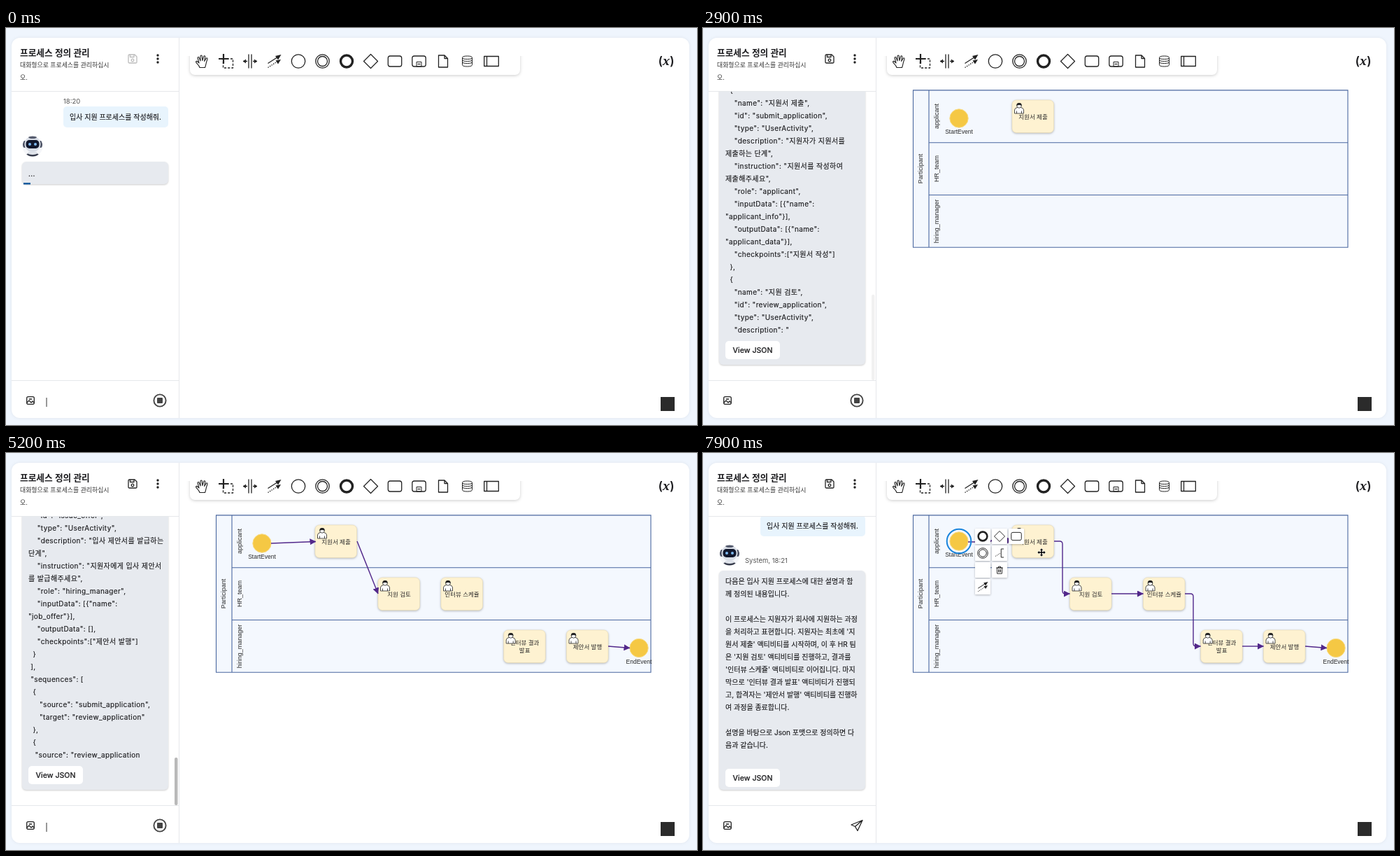
Write an HTML page that moves like this. It is 988x567 px and loops after 8 s.

```html
<!DOCTYPE html>
<html lang="ko">
<head>
<meta charset="utf-8">
<title>프로세스 정의 관리</title>
<style>
  html, body { margin: 0; width: 100%; height: 100%; overflow: hidden; background: #eff5fd; }
  svg { display: block; }
  text { white-space: pre; fill: #1c1c1f; font: 10px Inter, "Noto Sans CJK KR", "Noto Sans CJK", sans-serif; }
  .chat text { stroke: #1c1c1f; stroke-width: .15px; }
  .chat .muted { font-size: 9.5px; fill: #555; stroke: none; }
  .chat .json { letter-spacing: .38px; }
  .diagram text { font: 8.5px "Liberation Sans", "Noto Sans CJK KR", "Noto Sans CJK", sans-serif; fill: #2a2a2a; text-anchor: middle; }
  .diagram .lane { font-size: 9px; }
  .icon { fill: none; stroke: #222; stroke-width: 1.3; stroke-linejoin: round; }
  .solid { fill: #222; stroke: none; }
  .flow { fill: none; stroke: #52288a; stroke-width: 1.4; marker-end: url(#arrow); }
  .select { fill: none; stroke: #1a85dd; stroke-width: 2; }
  .shadow { filter: drop-shadow(0 1px 1.5px #0004); }
</style>
</head>
<body>
<svg id="stage" width="988" height="567" viewBox="0 0 988 567"></svg>
<script>
const LOOP = 8000, STEP = 100, DONE = 5800;

const activity = (name, id, desc, instruction, role, input, output, check, end = '},') => `  {
    "name": "${name}",
    "id": "${id}",
    "type": "UserActivity",
    "description": "${desc}",
    "instruction": "${instruction}",
    "role": "${role}",
    "inputData": [{"name":
"${input}"}],
    "outputData": [${output ? `{"name":\n"${output}"}` : ''}],
    "checkpoints":["${check}"]
  ${end}`;

const sequence = (source, target, indent, end = '},') => `  {
${indent}"source": "${source}",
${indent}"target": "${target}"
  ${end}`;

const lines = [
`다음은 입사 지원 프로세스에 대한 설명과 함
께 정의된 내용입니다.

이 프로세스는 지원자가 회사에 지원하는 과정
을 처리하고 표현합니다. 지원자는 최초에 '지
원서 제출' 액티비티를 시작하며, 이 후 HR 팀
은 '지원 검토' 액티비티를 진행하고, 결과를
'인터뷰 스케쥴' 액티비티로 이어집니다. 마지
막으로 '인터뷰 결과 발표' 액티비티가 진행되
고, 합격자는 '제안서 발행' 액티비티를 진행하
여 과정을 종료합니다.

설명을 바탕으로 Json 포맷으로 정의하면 다
음과 같습니다.

{
 "processDefinitionName": "입사 지원
프로세스",
 "processDefinitionId":
"job_application_process",
 "description": "지원자의 입사 지원을
처리하는 과정",
 "data": [{
    "name": "applicant_data",
    "description": "지원자 정보",
    "type": "Text"
  }, {
    "name": "review_result",
    "type": "Text"
  }, {
    "name": "job_offer"
 }],
 "roles": [{
   "name": "applicant",
   "resolutionRule": "지원서를 제출하는
사람"
 }, {
   "name": "HR_team",
   "resolutionRule": "지원서를 검토하고
인터뷰 일정을 조정하는 담당 팀"
 },
  {
   "name": "hiring_manager",
   "resolutionRule": "인터뷰를 진행하고
입사 제안을 결정하는 관리자"
  }
 ],
 "activities": [`,
activity('지원서 제출', 'submit_application', '지원자가 지원서를\n제출하는 단계', '지원서를 작성하여\n제출해주세요',
  'applicant', 'applicant_info', 'applicant_data', '지원서 작성'),
activity('지원 검토', 'review_application', 'HR 팀이 지원서를 검토\n하는 단계', '제출된 지원서를 검토 후\n결과를 알려주세요',
  'HR_team', 'applicant_data', 'review_result', '지원서 검토'),
activity('인터뷰 스케쥴', 'schedule_interview', '인터뷰 일정을 조정하는\n단계', '인터뷰 일정을 지원자와\n조율해주세요',
  'HR_team', 'review_result', 'interview_date', '일정 조정'),
activity('인터뷰 결과 발표', 'announce_result', '인터뷰 결과를 발표하는\n단계', '인터뷰 결과를 지원자에\n게 알려주세요',
  'hiring_manager', 'interview_date', 'job_offer', '결과 발표'),
activity('제안서 발행', 'issue_offer', '입사 제안서를 발급하는\n단계', '지원자에게 입사 제안서\n를 발급해주세요',
  'hiring_manager', 'job_offer', '', '제안서 발행', '}'),
` ],
 "sequences": [`,
sequence('submit_application', 'review_application', '     '),
sequence('review_application', 'schedule_interview', '   '),
sequence('schedule_interview', 'announce_result', '   '),
sequence('announce_result', 'issue_offer', '   ', '}'),
'  ]\n}'
].join('\n').split('\n');

// [time, number of lines typed]
const typing = [[200, 0], [1300, 9.97], [1500, 9.97], [2200, 50.33], [3600, 84.92], [5200, 129.95], [5700, lines.length]];

// Piecewise linear value of [time, value] keys.
function track(keys, t) {
  const i = keys.findIndex(k => k[0] > t);
  if (i < 0) return keys[keys.length - 1][1];
  if (i === 0) return keys[0][1];
  const [t0, a] = keys[i - 1], [t1, b] = keys[i];
  return a + (b - a) * (t - t0) / (t1 - t0);
}

const at = (x, y, body, cls = 'icon') => `<g class="${cls}" transform="translate(${x} ${y})">${body}</g>`;
const label = (x, y, s, attrs = '') => `<text x="${x}" y="${y + 3.6}" ${attrs}>${s}</text>`;
const rect = (x, y, w, h, r, attrs = '') => `<rect x="${x}" y="${y}" width="${w}" height="${h}" rx="${r}" ${attrs}/>`;
const circle = (r, attrs = '') => `<circle r="${r}" ${attrs}/>`;
const path = (d, attrs = '') => `<path d="${d}" ${attrs}/>`;

const icons = {
  hand: path('M-3 9C-4 5-7 4-8.5 1Q-8-1-6 .5L-4 2.5L-6-5Q-5-7.5-3.8-5L-2-.5L-2-7.5Q-.8-9.5.3-7.5L.8-1L3-7.5Q4.8-8.5 4.8-6L3.6 0L6.5-4.5Q8.5-5 7.8-2.5C6 2 6 5 4.5 9Z', 'stroke-width="1.1"'),
  lasso: path('M-4-3.5H10V9.5H-4Z', 'stroke-dasharray="3.2 2"') + path('M-3.5-10.5V3.5M-10.5-3.5H3.5', 'stroke-width="2.2"'),
  space: path('M-2-10V10M2-10V10M-10 0H-4M4 0H10') + path('M-10 0l4-3v6zM10 0l-4-3v6z', 'class="solid"'),
  connect: path('M-9 3L5-6') + path('M-9 9L5 0', 'stroke-dasharray="1.5 1.5"') +
    path('M10-9.5L1.5-7.5L5.5-2ZM9.5-2.5L2-1L5.5 4Z', 'class="solid"'),
  start: circle(9.7),
  between: circle(9.7) + circle(7),
  end: circle(8.5, 'stroke-width="3.4"'),
  gateway: path('M0-10L10 0L0 10L-10 0Z'),
  task: rect(-9.7, -7.5, 19.4, 15, 3),
  subprocess: rect(-9.7, -7.5, 19.4, 15, 3) + rect(-3.5, 1, 7, 6.5, 0, 'stroke-width="1"') + path('M-2 4H2'),
  document: path('M-6.5-8.5H2L6.5-4V8.5H-6.5ZM2-8.5V-4H6.5'),
  store: path('M-7-5V5Q-7 7.5 0 7.5T7 5V-5Q7-7.5 0-7.5T-7-5Q-7-3 0-3T7-5M-7-2Q-7 0 0 0T7-2M-7 1Q-7 3 0 3T7 1', 'stroke-width="1"'),
  pool: path('M-10.3-7H10.3V7H-10.3ZM-6.5-7V7'),
  note: path('M8-8H3V8H8') + path('M-8 6L2 0', 'stroke-dasharray="1.5 1.5"'),
  trash: path('M-5-4H5L4.5 7H-4.5ZM-6.5-4H6.5M-2-4V-6.5H2V-4M-2-1V4.5M0-1V4.5M2-1V4.5', 'stroke-width="1.2"')
};

const tools = ['hand', 'lasso', 'space', 'connect', 'start', 'between', 'end', 'gateway', 'task', 'subprocess', 'document', 'store', 'pool'];

const scenery = `
<defs>
  <clipPath id="chatArea"><rect x="8" y="91" width="239" height="412"/></clipPath>
  <clipPath id="barArea"><rect x="25" width="206" height="567"/></clipPath>
  <clipPath id="toolArea"><rect x="250" y="40" width="500" height="40"/></clipPath>
  <clipPath id="avatar"><circle r="14.5"/></clipPath>
  <linearGradient id="bar" gradientUnits="userSpaceOnUse" x1="23" x2="232"><stop stop-color="#145a9c"/><stop offset="1" stop-color="#7fd0f5"/></linearGradient>
  <marker id="arrow" viewBox="0 0 10 10" refX="9.5" refY="5" markerWidth="9" markerHeight="9" markerUnits="userSpaceOnUse" orient="auto"><path d="M0 0L10 5L0 10Z" fill="#52288a"/></marker>
</defs>
${rect(8, 14, 969, 543, 12, 'fill="#fff" style="filter:drop-shadow(0 0 2px #0001)"')}
${path('M247.5 14V557M8 90.5H247M8 503.5H247', 'stroke="#e6e8eb"')}
${label(20, 36, '프로세스 정의 관리', 'style="font-size:12.7px;font-weight:600"')}
${label(20, 52, '대화형으로 프로세스를 관리하십시', 'style="font-size:8.9px;fill:#333"')}
${label(20, 70, '오.', 'style="font-size:8.9px;fill:#333"')}
${at(217, 44, [-5, 0, 5].map(y => circle(1.7, `cy="${y}"`)).join(''), 'solid')}
${at(35, 532, rect(-5.3, -5.3, 10.6, 10.6, 2) + path('M-5 3L-2 0L1 3L3 1L5 3M-2-2H2'))}
<g clip-path="url(#toolArea)">${rect(263, 20, 472, 47, 7, 'fill="#fff" style="filter:drop-shadow(0 1px 2px #0003)"')}</g>
${tools.map((name, i) => at(280 + i * 34.5, 47.5, icons[name])).join('')}
<text x="944" y="52.5" text-anchor="middle" style="font-size:17px;font-weight:600">(<tspan style="font-family:'Noto Serif',serif;font-style:italic">x</tspan>)</text>
${rect(936, 527, 20, 20, 0, 'fill="#2b2b2b"')}
<g id="live"></g>`;

const robot = `<g clip-path="url(#avatar)">
  <rect x="-15" y="-15" width="30" height="30" fill="#f5f6f9"/>
  <ellipse cy="14" rx="10" ry="5" fill="#353a4a"/><ellipse cy="9.5" rx="7" ry="2.5" fill="#dfe3ea"/>
  <ellipse cx="-11.5" cy="-3" rx="2.5" ry="5" fill="#4a5063"/><ellipse cx="11.5" cy="-3" rx="2.5" ry="5" fill="#4a5063"/>
  <ellipse cy="-3" rx="11.5" ry="11" fill="#d9dee7"/><ellipse cy="-13" rx="6" ry="2" fill="#565c6e"/>
  <rect x="-9.5" y="-9" width="19" height="12" rx="5" fill="#11172c"/>
  <circle cx="-4" cy="-3" r="2" fill="#7db9f2"/><circle cx="4" cy="-3" r="2" fill="#7db9f2"/></g>`;

function chat(t, typed) {
  const done = t >= DONE, hasJson = typed >= 15;
  const count = done ? 15 : Math.max(1, Math.ceil(typed));
  const last = 206 + 18 * (count - 1);
  const bottom = last + (done ? 46 : hasJson ? 50 : 17);
  const scroll = Math.max(0, bottom - 481);
  const blinkOn = t % 1000 < 550;

  let out = label(82, 104, '18:20', 'class="muted"') +
    rect(82, 112, 150, 30, 5, 'fill="#e8f4fd"') + label(91, 127, '입사 지원 프로세스를 작성해줘.') +
    at(38, 169, robot, '') + (done ? label(60, 176, 'System, 18:21', 'class="muted"') : '') +
    rect(23, 191, 209, bottom - 191, 6, 'fill="#e7eaef" style="filter:drop-shadow(0 1px 1px #0003)"');

  if (typed <= 0) out += label(32, 208, '...', 'class="json"');
  for (let i = 0; i < count; i++) {
    const y = 206 + 18 * i;
    if (y - scroll < 75) continue;
    const shown = done ? lines[i] : lines[i].slice(0, Math.floor(lines[i].length * Math.min(1, Math.max(0, typed - i))));
    out += label(32, y, shown, i < 15 ? '' : 'class="json"');
  }
  if (hasJson) out += rect(32, last + 16, 78, 26, 5, 'fill="#fff"') +
    label(71, last + 29, 'View JSON', 'text-anchor="middle" style="font-size:10.6px;font-weight:500"');
  if (!done && (t < 1400 || t > 2000)) {
    const x = 23 - 34 + 390 * (t / 611.8 % 1);
    out += `<g clip-path="url(#barArea)">${rect(x, bottom - 2, 46, 2.5, 0, 'fill="url(#bar)"')}</g>`;
  }
  out = `<g class="chat" clip-path="url(#chatArea)"><g transform="translate(0 ${-scroll})">${out}</g></g>`;

  if (scroll && !done) {
    const thumb = 413 * 413 / (413 + scroll);
    out += rect(241, 503 - thumb, 4.5, thumb, 2, `fill="#b9b9b9" opacity="${blinkOn ? 1 : .2}"`);
  }
  out += at(181, 44, path('M-6-4.5Q-6-6-4.5-6H3L6-3V4.5Q6 6 4.5 6H-4.5Q-6 6-6 4.5ZM-3.5-6V-2.5H2V-6') + circle(1.8, 'cy="2"'), `icon" opacity="${hasJson ? 1 : .3}`);
  if (done) return out + at(220, 532, path('M8-7.5L-8-1L-2.5 1.5L1 7.5ZM8-7.5L-2.5 1.5'));
  if (blinkOn) out += path('M58 528V541', 'stroke="#333"');
  return out + at(220, 532, circle(8.6, 'stroke="#444" stroke-width="1.9"') + rect(-4, -4, 8, 8, 1, 'fill="#444" stroke="none"'));
}

const person = path('M-6.5 7V2Q-6-1-2.5-1.5L2.5-1.5Q6-1 6.5 2V7ZM-3.5 7V3.5M3.5 7V3.5', 'fill="#fff" stroke="#222" stroke-width=".8"') +
  circle(3.4, 'cy="-4.2" fill="#fff" stroke="#222" stroke-width=".8"') + path('M-3.5-4Q-4-8 0-8T3.5-4Q0-6-3.5-4Z', 'fill="#222"');

const task = (x, y, ...names) => at(x, y,
  rect(0, 0, 59.5, 46.5, 6, 'class="shadow" fill="#fef2d1" stroke="#eadcb4" stroke-width=".6"') +
  names.map((s, i) => label(30, 23 + (i - (names.length - 1) / 2) * 10.5, s)).join('') + at(10, 12, person, ''), '');

const event = (x, y, name) => at(x, y, circle(13.2, 'fill="#f5c844" stroke="#f9dc86"') + label(0, 18.5, name), '');
const flow = d => path(d, 'class="flow"');

function contextPad(x, y) {
  const rows = [['end', 'gateway', 'task'], ['between', 'note'], ['', 'trash'], ['connect']];
  return rows.map((row, r) => row.map((name, c) => at(x + 24 * c, y + 24 * r,
    rect(-11, -11, 22, 22, 1, 'class="shadow" fill="#fff" stroke="none"') + `<g transform="scale(.75)">${icons[name] || ''}</g>`)).join('')).join('');
}

function diagram(t, typed) {
  if (typed < 44) return '';
  const reviewX = track([[5900, 532], [6100, 524.5]], t);
  const scheduleX = track([[6100, 622], [6300, 629.5]], t);
  const startY = track([[6300, 129], [6400, 126]], t);
  const moved = t >= 6000;
  const vertical = (x, y, s) => `<text class="lane" transform="translate(${x + 3} ${y}) rotate(-90)">${s}</text>`;
  const when = (line, body) => typed >= line ? body : '';
  const elbow = (x0, x, x1, y0, y1) => `M${x0} ${y0}H${x - 4}Q${x} ${y0} ${x} ${y0 + 4}V${y1 - 4}Q${x} ${y1} ${x + 4} ${y1}H${x1}`;

  let out = path('M300.5 88.9H922V313.3H300.5ZM323 88.9V313.3M323 163.7H922M323 238.5H922', 'fill="#f4f8fe" stroke="#4a679f" stroke-width="1.1"') +
    vertical(311, 201, 'Participant') + vertical(334, 126, 'applicant') + vertical(334, 201, 'HR_team') + vertical(334, 276, 'hiring_manager') +
    when(62, event(366, startY, 'StartEvent') + task(442, 103, '지원서 제출')) +
    when(77, task(reviewX, 178, '지원 검토')) +
    when(92, task(scheduleX, 178, '인터뷰 스케쥴')) +
    when(107, task(711.7, 253, '인터뷰 결과', '발표')) +
    when(121, task(801.5, 253, '제안서 발행') + event(905, 278.5, 'EndEvent')) +
    when(124, flow(t >= 6400 ? 'M379 127H409Q412 127 412 125H443' : 'M379 129L443 126.5') + flow('M861 276L892 278.5')) +
    when(127, flow(moved ? elbow(502, 514, reviewX, 126, 201) : 'M502 126L532 201')) +
    when(131, flow(`M${reviewX + 59.5} 201H${scheduleX}`)) +
    when(135, flow(t >= 6200 ? elbow(scheduleX + 59.5, 701, 711.5, 201, 276) : 'M682 201L711.5 276')) +
    when(139, flow('M771 276H801.5'));

  const selectTask = (x, y) => rect(x - 3.5, y - 3, 67, 52.5, 9, 'class="select"') + contextPad(x + 81, y + 7);
  if (t >= 7300 || t === 6400) out += at(366, startY, circle(17.3), 'select') + contextPad(400, startY - 7);
  else if (t >= 6500) out += selectTask(442, 103);
  else if (t >= 6200) out += selectTask(scheduleX, 178);
  else if (t >= 6000) out += selectTask(reviewX, 178);
  return `<g class="diagram">${out}</g>`;
}

function cursor(t) {
  if (t < 5900) return '';
  const x = track([[5900, 575], [6000, 562], [6100, 555], [6200, 655], [6300, 662], [6400, 366], [6500, 484], [6900, 484], [7300, 366], [7500, 366], [7900, 484]], t);
  const y = track([[5900, 240], [6000, 208], [6300, 208], [6400, 130], [6500, 139], [6900, 139], [7300, 128], [7500, 128], [7900, 142]], t);
  return at(x, y, t >= 7300
    ? path('M0-6L2.5-3H1V-1H3V-2.5L6 0L3 2.5V1H1V3H2.5L0 6L-2.5 3H-1V1H-3V2.5L-6 0L-3-2.5V-1H-1V-3H-2.5Z', 'fill="#000" stroke="#fff" stroke-width=".5"')
    : path('M0 0V10L2.4 7.8L4 11.5L5.8 10.7L4.2 7.2H7.3Z', 'fill="#000" stroke="#fff" stroke-width=".8"'), '');
}

document.getElementById('stage').innerHTML = scenery;
const live = document.getElementById('live');
let drawn = -1;

function frame() {
  const t = Math.floor(performance.now() % LOOP / STEP) * STEP;
  if (t !== drawn) {
    const typed = track(typing, t);
    live.innerHTML = chat(t, typed) + diagram(t, typed) + cursor(t);
    drawn = t;
  }
  requestAnimationFrame(frame);
}
frame();
</script>
</body>
</html>
```
